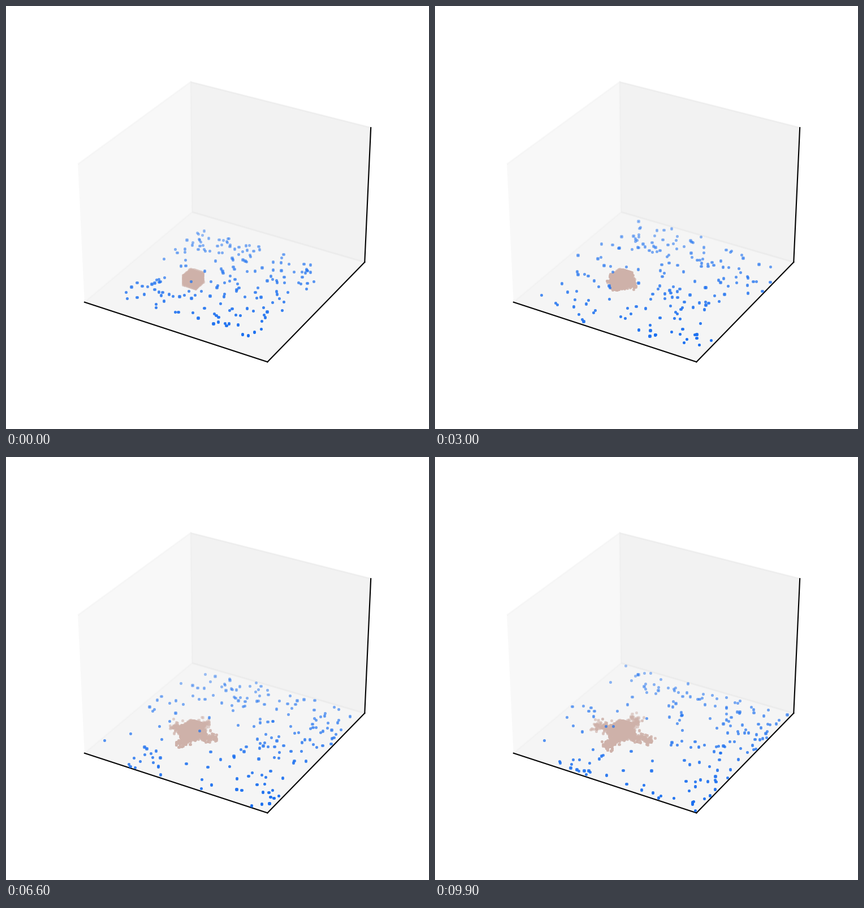
Recreate the animation shown at these times as a matplotlib script. Size 748 by 748 pixels, loop 10 s.

```python
import numpy as np
import matplotlib.pyplot as plt
from matplotlib.animation import FuncAnimation
from matplotlib.colors import to_rgb

FRAMES, INTERVAL = 100, 100
GRID = 100
WALKERS = 180
CENTRE = np.array([36.5, 40.5])
HALF = 3.5                     # half the side of the seed cube, in cells
BLUE, BROWN = "#1a6ff0", "#ceb1a9"

rng = np.random.default_rng(12)


def walk():
    """Random walks that drift away from the colony and bounce off the walls."""
    p = rng.uniform(0.12, 0.87, (WALKERS, 2))
    path = [p]
    for _ in range(FRAMES - 1):
        away = p - CENTRE / GRID
        r = np.hypot(*away.T)[:, None] + 1e-6
        drift = 0.006 * np.exp(-r / 0.25) * away / r + [0.0011, 0]
        p = p + drift + rng.normal(0, 0.016, p.shape)
        p = 0.99 - np.abs(0.98 - np.abs(p - 0.01))
        path.append(p)
    return np.array(path) * GRID


def place(axis, sign, out, side, z):
    """Cell lying `out` steps beyond one face of the cube."""
    offset = np.zeros(2)
    offset[axis] = sign * (HALF + out)
    offset[1 - axis] = side
    return (*(CENTRE + offset), z)


def grow():
    """Cells of the colony and the frame at which each one appears."""
    steps = np.arange(-HALF, HALF + 1)
    cells = [(CENTRE[0] + i, CENTRE[1] + j, k)
             for i in steps for j in steps for k in range(8)]
    born = [0] * len(cells)
    for axis in (0, 1):
        for sign in (-1, 1):
            # tapering layers on the faces
            for out in (1, 2, 3):
                for side in steps[np.abs(steps) <= HALF + 0.5 - out]:
                    for z in range(8 - out):
                        if rng.random() < 0.75:
                            cells.append(place(axis, sign, out, side, z))
                            born.append(4 * out - 3 + rng.uniform(0, 6))
            # ragged arms near the floor
            for _ in range(110):
                out = 1 + int(12 * rng.random() ** 1.15)
                side = np.round(rng.normal(0, 1.9))
                z = min(int(rng.exponential(1.8)), 5)
                cells.append(place(axis, sign, out, side, z))
                born.append(7 * out - 5 + abs(side) * 2.5 + rng.uniform(0, 12))
    return np.array(cells), np.array(born)


def shade(color, pts, low):
    """Fade points with their distance from the viewer."""
    depth = pts @ [-0.433, 0.75, -0.375]
    far = (depth - depth.min()) / np.ptp(depth)
    rgba = np.empty((len(pts), 4))
    rgba[:, :3] = to_rgb(color)
    rgba[:, 3] = 1 - (1 - low) * far
    return rgba


paths = walk()
cells, born = grow()

fig = plt.figure(figsize=(4, 4), dpi=187)
ax = fig.add_subplot(projection="3d", computed_zorder=False)
ax.set(xlim=(0, GRID), ylim=(0, GRID), zlim=(0, GRID),
       xticks=[], yticks=[], zticks=[])


def dots(pts, color, low, zorder):
    ax.scatter(*pts.T, c=shade(color, pts, low), marker="s", s=0.25,
               linewidths=1.5, depthshade=False, zorder=zorder)


def update(i):
    for c in list(ax.collections):
        c.remove()
    dots(cells[born <= i], BROWN, 0.45, 1)
    dots(np.column_stack([paths[i], np.zeros(WALKERS)]), BLUE, 0.42, 2)
    return ax.collections


anim = FuncAnimation(fig, update, frames=FRAMES, interval=INTERVAL,
                     repeat=True, repeat_delay=0, blit=False)
plt.show()
```
